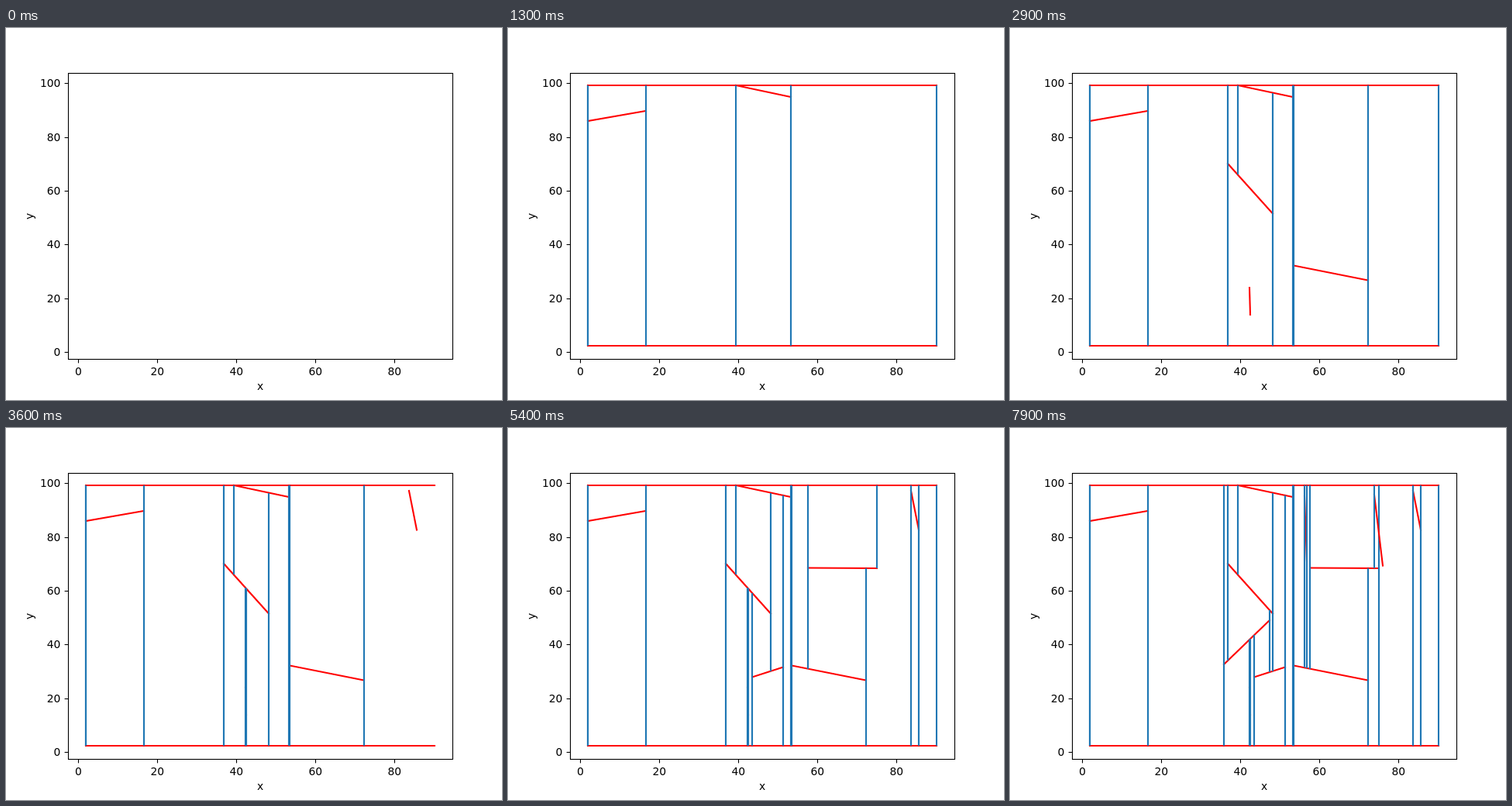
An HTML page with a canvas for the animation above (8000 ms loop, 640 by 480 pixels).

```html
<!DOCTYPE html>
<html>
<head>
<meta charset="utf-8">
<style>
html, body { margin: 0; width: 640px; height: 480px; overflow: hidden; background: #fff; }
canvas { display: block; }
</style>
</head>
<body>
<canvas id="stage" width="640" height="480"></canvas>
<script>
const ctx = document.getElementById('stage').getContext('2d');
const STEP = 100, STEPS = 80;

const segment = (x1, y1, x2, y2) => ({
  x1, y1, x2, y2,
  at: x => y1 + (y2 - y1) * (x - x1) / (x2 - x1)
});
const top_ = segment(103, 74, 553, 74);
const bottom = segment(103, 410, 553, 410);
const segments = [
  [294, 74, 365, 89], [103, 120, 178, 107], [366, 306.5, 462, 325.5],
  [281, 175, 339, 239.5], [309, 335, 310, 370], [520, 81, 530, 131.5],
  [315, 321.5, 355, 308.5], [387, 180.5, 476, 181], [380, 88, 383, 172],
  [276, 305, 335, 248], [470, 86, 481, 177.5]
].map(p => segment(...p));

// Incremental trapezoidal map; every draw, removal and addition is one step.
const steps = [];
const traps = new Set();
const show = (...items) => steps.push(shown => items.forEach(i => shown.add(i)));

function addTrap(top, bot, l, r) {
  const trap = { top, bot, l, r };
  traps.add(trap);
  show(trap);
}

function removeTrap(trap) {
  traps.delete(trap);
  steps.push(shown => shown.delete(trap));
}

function crosses(s, t) {
  const a = Math.max(s.x1, t.l), b = Math.min(s.x2, t.r), m = (a + b) / 2;
  return a < b && t.top.at(m) < s.at(m) && s.at(m) < t.bot.at(m);
}

function insert(s) {
  const crossed = [...traps].filter(t => crosses(s, t)).sort((a, b) => a.l - b.l);
  let upperStart = s.x1, lowerStart = s.x1;
  show(s);
  crossed.forEach((t, i) => {
    const next = crossed[i + 1], end = next ? t.r : s.x2;
    removeTrap(t);
    if (!i) addTrap(t.top, t.bot, t.l, s.x1);
    if (!next || next.top !== t.top) {
      addTrap(t.top, s, upperStart, end);
      upperStart = end;
    }
    if (!next || next.bot !== t.bot) {
      addTrap(s, t.bot, lowerStart, end);
      lowerStart = end;
    }
    if (!next) addTrap(t.top, t.bot, s.x2, t.r);
  });
}

show(top_, bottom);
addTrap(top_, bottom, 103, 553);
segments.forEach(insert);

function line(x1, y1, x2, y2) {
  ctx.beginPath();
  ctx.moveTo(x1, y1);
  ctx.lineTo(x2, y2);
  ctx.stroke();
}

function drawItem(item) {
  if (item.at) {
    ctx.strokeStyle = '#f00';
    ctx.lineCap = 'square';
    line(item.x1, item.y1, item.x2, item.y2);
    return;
  }
  ctx.strokeStyle = '#1f77b4';
  ctx.lineCap = 'butt';
  for (const x of [item.l, item.r]) {
    const y1 = Math.round(item.top.at(x)), y2 = Math.round(item.bot.at(x));
    if (y2 > y1) line(x, y1, x, y2);
  }
}

function drawAxes() {
  ctx.strokeStyle = ctx.fillStyle = '#000';
  ctx.lineCap = 'butt';
  ctx.lineWidth = 1.11;
  ctx.font = '13.89px "DejaVu Sans", sans-serif';
  ctx.strokeRect(80.5, 58.5, 496, 369);
  ctx.textAlign = 'center';
  for (let v = 0; v <= 80; v += 20) {
    const x = 93 + v * 5.1;
    line(x + 0.5, 428, x + 0.5, 432.4);
    ctx.fillText(v, x + 0.3, 448);
  }
  ctx.fillText('x', 328, 467);
  ctx.textAlign = 'right';
  for (let v = 0; v <= 100; v += 20) {
    const y = Math.round(417.9 - v * 3.467);
    line(75.6, y + 0.5, 80, y + 0.5);
    ctx.fillText(v, 70.4, y + 5);
  }
  ctx.save();
  ctx.translate(35, 243);
  ctx.rotate(-Math.PI / 2);
  ctx.textAlign = 'center';
  ctx.fillText('y', 0, 0);
  ctx.restore();
}

let last = -1;
function frame(now) {
  const count = Math.floor(now / STEP) % STEPS;
  if (count !== last) {
    last = count;
    const shown = new Set();
    steps.slice(0, count).forEach(step => step(shown));
    ctx.fillStyle = '#fff';
    ctx.fillRect(0, 0, 640, 480);
    ctx.lineWidth = 2.083;
    shown.forEach(drawItem);
    drawAxes();
  }
  requestAnimationFrame(frame);
}
frame(0);
</script>
</body>
</html>
```
